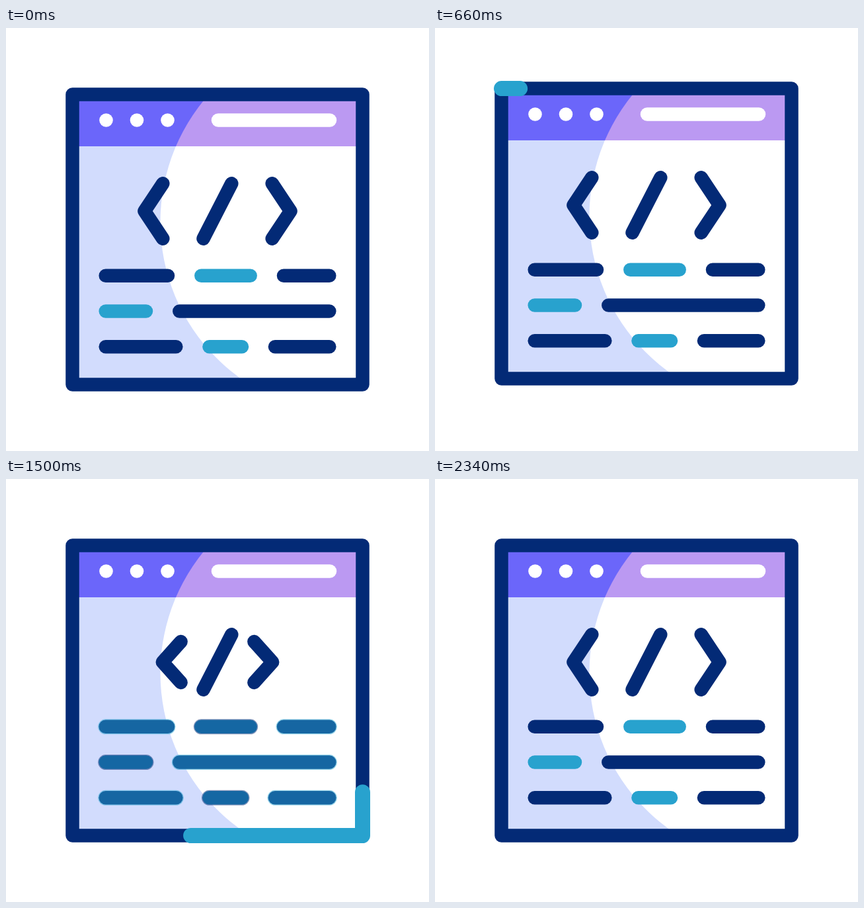
These frames come from a looping animation (640x640 px, 2400 ms). An HTML page:

```html
<!DOCTYPE html>
<html lang="en">
<head>
<meta charset="utf-8">
<title>Code window</title>
<style>
  html, body { margin: 0; width: 100%; height: 100%; overflow: hidden; background: #fff; }
  svg { display: block; width: 100vw; height: 100vh; }
  .stroke { fill: none; stroke-width: 20.5; stroke-linecap: round; stroke-linejoin: round; }
  .over { stroke-width: 23; }
  .navy { stroke: #032a76; }
  .teal { stroke: #28a2ce; }
</style>
</head>
<body>
<svg viewBox="0 0 640 640">
  <defs>
    <clipPath id="pane"><rect x="100.5" y="100.5" width="439" height="439"/></clipPath>
  </defs>
  <g id="win">
    <g clip-path="url(#pane)">
      <rect x="100" y="100" width="440" height="440" fill="#d2dcfd"/>
      <circle cx="524.7" cy="293.7" r="291.2" fill="#fff"/>
      <g clip-path="url(#bar)">
        <rect x="100" y="100" width="440" height="79" fill="#6b66fa"/>
        <circle cx="524.7" cy="293.7" r="291.2" fill="#bb99f2"/>
      </g>
    </g>
    <clipPath id="bar"><rect x="100" y="100" width="440" height="79"/></clipPath>
    <g fill="#fff">
      <circle cx="151.5" cy="139.5" r="10.3"/>
      <circle cx="198" cy="139.5" r="10.3"/>
      <circle cx="244.5" cy="139.5" r="10.3"/>
    </g>
    <path class="stroke" stroke="#fff" d="M321 139.5H490"/>
    <rect class="stroke navy" x="100.5" y="100.5" width="439" height="439"/>
    <path class="stroke navy" d="M341.3 235.3L298.5 318.7"/>
    <path class="stroke navy" id="left"/>
    <path class="stroke navy" id="right"/>
    <g id="rows"></g>
    <g id="swap"></g>
    <path class="stroke over teal" id="runner" pathLength="1000"
          d="M100.5 100.5H539.5V539.5H100.5V100.5"/>
  </g>
</svg>
<script>
  const LOOP = 2400, STEP = 20, BEAT = 200;
  const $ = id => document.getElementById(id);

  // y, x1, x2, is accent
  const rows = [
    [374.8, 150.7, 245, 0], [374.8, 295.3, 369.7, 1], [374.8, 420, 489.3, 0],
    [428.6, 150.7, 212, 1], [428.6, 262.3, 489.3, 0],
    [482.3, 150.7, 257.3, 0], [482.3, 307.5, 357, 1], [482.3, 407, 489.3, 0]
  ];
  const line = ([y, x1, x2], cls) => `<path class="stroke ${cls}" d="M${x1} ${y}H${x2}"/>`;
  $('rows').innerHTML = rows.map(r => line(r, r[3] ? 'teal' : 'navy')).join('');
  $('swap').innerHTML = rows.map(r => line(r, r[3] ? 'over navy' : 'over teal')).join('');

  const clamp = u => Math.min(1, Math.max(0, u));
  const smooth = u => u * u * (3 - 2 * u);

  function bezier(x1, y1, x2, y2) {
    const at = (s, a, b) => 3 * (1 - s) * (1 - s) * s * a + 3 * (1 - s) * s * s * b + s * s * s;
    return x => {
      let lo = 0, hi = 1;
      for (let i = 0; i < 24; i++) {
        const mid = (lo + hi) / 2;
        if (at(mid, x1, x2) < x) lo = mid; else hi = mid;
      }
      return at((lo + hi) / 2, y1, y2);
    };
  }
  const drop = bezier(.167, 0, .833, .9);
  const fade = bezier(.167, 0, .833, 1);

  // Two peaks of height 1, one beat up and one beat down each
  function pulse(t, start, ease) {
    const beats = (t - start) / BEAT;
    if (beats <= 0 || beats >= 4) return 0;
    return 1 - ease(Math.abs(beats % 2 - 1));
  }

  function draw(t) {
    $('win').setAttribute('transform', `translate(0 ${-29.2 * pulse(t, 200, drop)})`);

    const squeeze = pulse(t, 1000, drop);
    const dx = 50.8 * squeeze, half = 41.7 - 20 * squeeze;
    const end = 237.3 + dx, tip = 209.5 + dx;
    const angle = (e, p) => `M${e} ${277 - half}L${p} 277L${e} ${277 + half}`;
    $('left').setAttribute('d', angle(end, tip));
    $('right').setAttribute('d', angle(640 - end, 640 - tip));

    const mix = pulse(t, 1000, fade);
    for (const p of $('swap').children) p.style.opacity = mix;

    const head = 1000 * smooth(clamp((t - 540) / 1600));
    const tail = 1000 * smooth(clamp((t - 740) / 1600));
    const run = $('runner').style;
    run.display = head > tail ? '' : 'none';
    run.strokeDasharray = `${head - tail} 2000`;
    run.strokeDashoffset = -tail;
  }

  function tick() {
    const t = performance.now() % LOOP;
    draw(Math.floor(t / STEP) * STEP);
    requestAnimationFrame(tick);
  }
  tick();
</script>
</body>
</html>
```
